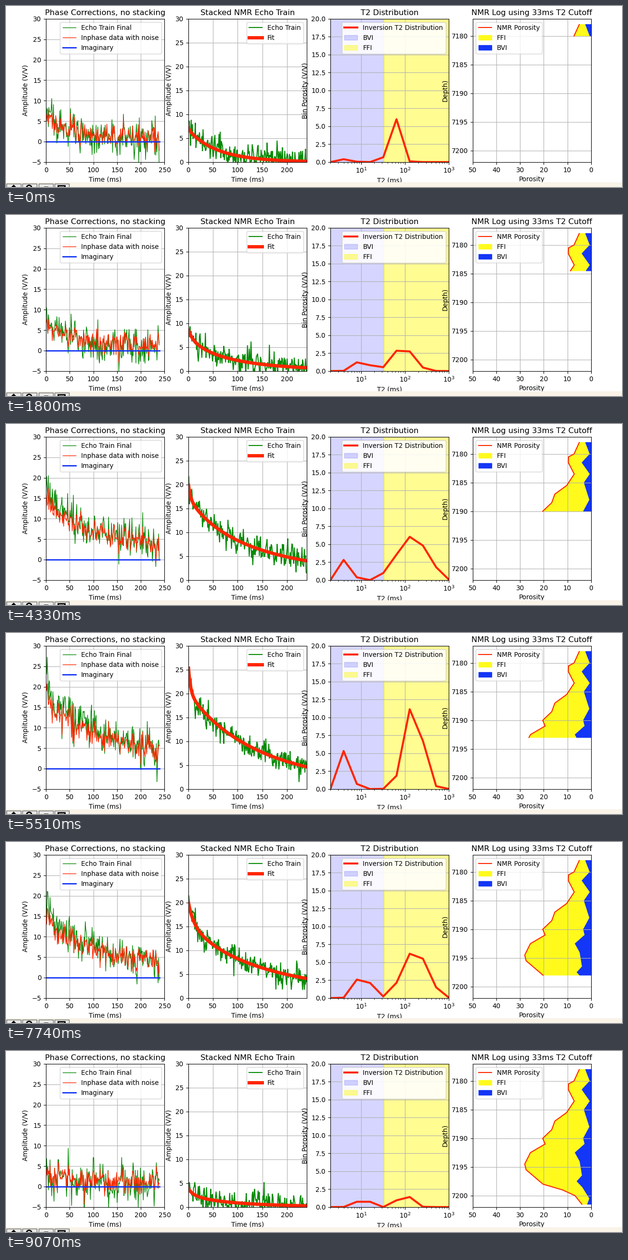
Animation, 1280 px wide and 379 px high, one loop 9.64 s. Source, as a matplotlib script:

```python
import matplotlib.pyplot as plt
import numpy as np
from matplotlib.animation import FuncAnimation
from matplotlib.patches import Circle, Polygon, Rectangle

LOOP, SLOTS = 9640, 65
W, H = 1280, 379
RED, GREEN, BLUE, YELLOW = "#ff2600", "#068a06", "#1436f6", "#fffa1c"

plt.rcParams.update({"font.family": "DejaVu Sans", "font.size": 9.75,
                     "axes.titlepad": 5.5})

# The log: one sample every half metre, drawn through a few turning points
FIRST, LAST = 4, 47
SAMPLE = np.arange(LAST + 1)
DEPTH = 7178 + SAMPLE / 2
POROSITY = np.interp(
    SAMPLE,
    [0, 4, 5, 7, 11, 15, 18, 21, 24, 26, 29, 33, 35, 40, 42, 44, 47],
    [5, 7.2, 9.5, 9.6, 7.1, 10.3, 15.3, 16.6, 20.4, 19.4, 25.6, 28, 27.4,
     20.3, 12.1, 6.8, 3.9])
BOUND = np.interp(
    SAMPLE,
    [0, 4, 7, 11, 14, 20, 24, 26, 29, 32, 37, 39, 41, 45, 47],
    [2.3, 0.45, 3.8, 0.4, 2.9, 0.6, 3.2, 2.6, 6.7, 4.7, 3.7, 5.9, 3.6, 0.6, 1.5])

# Each spectrum has a fast and a slow peak, placed in octaves of T2
OCTAVE = np.arange(1, 11)
T2 = 2.0 ** OCTAVE
KEYS = [0, 9, 14, 20, 26, 36, 43]
FAST = [2, 3.4, 2.55, 2, 2, 3.45, 3.5]
SLOW = [5.85, 6.48, 6.8, 7.2, 7.28, 7.4, 6.6]
SPREAD = [0.4, 0.77, 0.62, 1.15, 0.66, 0.92, 0.5]

ECHO = np.arange(0, 240, 1.2)
ECHO_FIT = np.linspace(0.6, 240, 240)


def peak(octaves, centre, width, area):
    bins = np.exp(-((octaves - centre) / width) ** 2 / 2)
    return area * bins / bins.sum()


def spectrum(step):
    fast, slow, spread = (np.interp(step, KEYS, v) for v in (FAST, SLOW, SPREAD))
    bound, total = BOUND[FIRST + step], POROSITY[FIRST + step]
    amps = np.zeros(len(T2))
    amps[1:4] = peak(OCTAVE[1:4], fast, 0.5, bound)
    amps[4:9] = peak(OCTAVE[4:9], slow, spread, total - bound)
    return amps


def decay(t, amps):
    return np.exp(-t[:, None] / T2) @ amps


fig = plt.figure(figsize=(W / 100, H / 100), dpi=100, facecolor="white")


def panel(col, title, xlabel, ylabel, xlim, ylim, xticks, yticks):
    left = 83.2 + col * 295.45
    ax = fig.add_axes([left / W, (H - 326.8) / H, 246.2 / W, 300 / H])
    if xticks is None:
        ax.set_xscale("log")
    else:
        ax.set_xticks(xticks)
    ax.set_yticks(yticks)
    ax.set(title=title, xlabel=xlabel, ylabel=ylabel, xlim=xlim, ylim=ylim)
    ax.grid(True)
    return ax


ax1 = panel(0, "Phase Corrections, no stacking", "Time (ms)", "Amplitude (V/V)",
            (0, 250), (-5, 30), range(0, 251, 50), range(-5, 31, 5))
raw, = ax1.plot([], [], color=GREEN, lw=1, label="Echo Train Final")
inphase, = ax1.plot([], [], color=RED, lw=1, label="Inphase data with noise")
ax1.plot([0, 239], [0, 0], color=BLUE, lw=2, label="Imaginary")
ax1.legend(loc="upper right")

ax2 = panel(1, "Stacked NMR Echo Train", "Time (ms)", "Amplitude (V/V)",
            (0, 240), (0, 30), range(0, 201, 50), range(0, 31, 5))
stacked, = ax2.plot([], [], color=GREEN, lw=1.5, label="Echo Train")
fit, = ax2.plot([], [], color=RED, lw=5, label="Fit")
ax2.legend(loc="upper right")

ax3 = panel(2, "T2 Distribution", "T2 (ms)", "Bin Porosity (V/V)",
            (2, 1000), (0, 20), None, np.arange(0, 20.1, 2.5))
dist, = ax3.plot([], [], color=RED, lw=3, label="Inversion T2 Distribution")
ax3.axvspan(2, 33, color="#1717ff", alpha=0.18, label="BVI")
ax3.axvspan(33, 1000, color=YELLOW, alpha=0.48, label="FFI")
ax3.set_xlim(2, 1000)
ax3.legend(loc="upper right", framealpha=0.88)

ax4 = panel(3, "NMR Log using 33ms T2 Cutoff", "Porosity", "Depth)",
            (50, 0), (7202, 7177), range(0, 51, 10), range(7180, 7201, 5))
total_line, = ax4.plot([], [], color=RED, lw=1.5, label="NMR Porosity")
free_area, = ax4.fill([0, 0], [7178, 7178], color=YELLOW, label="FFI")
bound_area, = ax4.fill([0, 0], [7178, 7178], color=BLUE, label="BVI")
ax4.legend(loc="upper left")


def toolbar():
    bar = fig.add_axes([0, 0, 1, 10 / H], zorder=5)
    bar.set(xlim=(0, W), ylim=(H, H - 10))
    bar.axis("off")
    bar.add_patch(Rectangle((0, 369), W, 10, fc="#f9f3e8", ec="none"))
    for i in range(4):
        bar.add_patch(Rectangle((1 + 33.4 * i, 371.5), 30, 20,
                                fc="#e9e9e7", ec="#6e6e6c", lw=1))
    bar.add_patch(Polygon([(16, 374), (9, 381), (23, 381)], fc="black"))
    bar.add_patch(Circle((48, 381), 5.5, fc="none", ec="black", lw=2))
    bar.add_patch(Rectangle((79, 378), 9, 2, fc="#444444"))
    bar.add_patch(Rectangle((107.5, 375.5), 14, 12, fc="#e9e9e7", ec="black", lw=2))


def area(x0, x1, y):
    return np.column_stack([np.r_[x0, x1[::-1]], np.r_[y, y[::-1]]])


def update(slot):
    # The log advances about two steps in every three slots
    step = min(int(0.6955 * slot + 0.67), LAST - FIRST)
    rng = np.random.default_rng(100 + step)
    amps = spectrum(step)
    signal = decay(ECHO, amps)
    noise = rng.normal(0, 2.4, ECHO.size)

    raw.set_data(ECHO, 0.93 * signal + noise)
    inphase.set_data(ECHO, 0.76 * signal + 0.8 + 0.5 * noise
                     + rng.normal(0, 0.9, ECHO.size))
    stacked.set_data(ECHO + 1.2, signal + rng.normal(0, 1.35, ECHO.size))
    fit.set_data(ECHO_FIT, decay(ECHO_FIT, amps))
    dist.set_data(T2, amps)

    n = FIRST + step + 1
    y, total, bound = DEPTH[:n], POROSITY[:n], BOUND[:n]
    total_line.set_data(total, y)
    free_area.set_xy(area(bound, total, y))
    bound_area.set_xy(area(np.zeros(n), bound, y))
    return raw, inphase, stacked, fit, dist, total_line, free_area, bound_area


toolbar()
anim = FuncAnimation(fig, update, frames=SLOTS, interval=LOOP / SLOTS,
                     repeat=True, repeat_delay=0)
plt.show()
```
